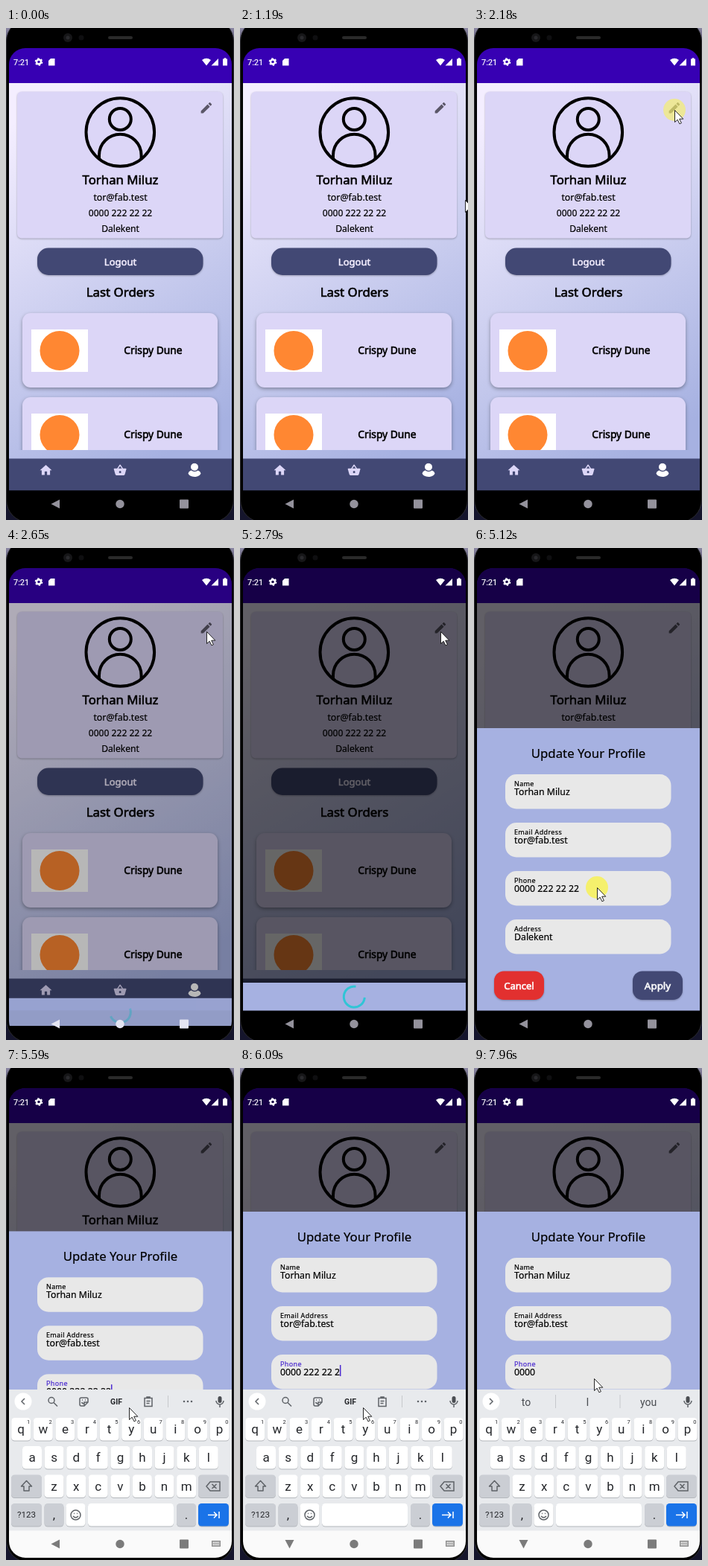
Animation of 306x661 px, one loop 8 s. Source, as an HTML page:

```html
<!DOCTYPE html>
<html lang="en">
<head>
<meta charset="utf-8">
<title>Profile screen</title>
<style>
html, body { margin: 0; width: 100%; height: 100%; overflow: hidden; background: #000; }
svg { display: block; width: 100%; height: 100%; }
text {
  font-family: "Noto Sans", "Open Sans", sans-serif; white-space: pre;
  fill: currentColor; stroke: currentColor; stroke-width: .2;
}
.mid { text-anchor: middle; }
.medium { stroke-width: .6; }
.label { font-size: 9px; letter-spacing: .35px; }
.value { font-size: 12.3px; }
.shade { filter: drop-shadow(0 1px 1px #0004); }
.deep { filter: drop-shadow(0 2.5px 2.5px #0005); }
.line { fill: none; stroke: #5f6368; stroke-width: 1.5; }
.dots { stroke-width: 2.6; stroke-linecap: round; stroke-dasharray: 0 5; }
.roboto, .kb text { font-family: Roboto, "Open Sans", sans-serif; }
.kb text { color: #25272b; stroke: none; text-anchor: middle; }
.kb .chips text { font-size: 14px; color: #4a4d52; }
</style>
</head>
<body>
<svg viewBox="0 0 306 661">
  <defs>
    <linearGradient id="sky" x1=".32" y1="0" x2=".68" y2="1">
      <stop stop-color="#f4eeff"/><stop offset="1" stop-color="#a6b1e1"/>
    </linearGradient>
    <linearGradient id="desk" x2="0" y2="1">
      <stop stop-color="#8d89a4"/><stop offset=".06" stop-color="#15152c"/>
    </linearGradient>
    <clipPath id="screen"><rect x="4" y="27" width="299" height="631" rx="22"/></clipPath>
    <clipPath id="list"><rect x="4" y="370" width="299" height="197"/></clipPath>
    <clipPath id="sheetClip"><rect id="sheetBox" x="4" width="299"/></clipPath>
  </defs>

  <!-- phone body -->
  <rect width="306" height="661" fill="url(#desk)"/>
  <rect x=".5" y="-12" width="305" height="676" rx="30" stroke="#2c2c30"/>
  <circle cx="83" cy="13" r="6" fill="#161618"/><circle cx="83" cy="13" r="2.5" fill="#29292d"/>
  <circle cx="101" cy="13" r="3.5" fill="#0e0e10"/>
  <rect x="137" y="11" width="33" height="4" rx="2" fill="#2a2a2a"/>

  <g clip-path="url(#screen)">
    <rect x="4" y="27" width="299" height="47" fill="#3700b3"/>
    <rect x="4" y="74" width="299" height="505" fill="url(#sky)"/>
    <rect class="shade" x="15" y="85.5" width="276" height="197" rx="6" fill="#dcd6f7"/>
    <g fill="none" stroke="#000" stroke-width="4">
      <circle cx="153.3" cy="140" r="45.8"/>
      <circle cx="153.3" cy="122.5" r="14.5"/>
      <path d="M125 176v-5a28.3 28.3 0 0 1 56.6 0v5"/>
    </g>
    <path transform="translate(259.2 97.6) scale(.81)" fill="#5b5768" d="M3 17.25V21h3.75L17.8 9.94l-3.75-3.75zM20.7 7.04c.4-.4.4-1 0-1.4l-2.34-2.35c-.4-.4-1-.4-1.4 0l-1.83 1.83 3.75 3.75z"/>
    <g class="mid">
      <text class="medium" x="153.5" y="210" font-size="16.8">Torhan Miluz</text>
      <text x="153.5" y="232" font-size="12.4">tor@fab.test</text>
      <text x="153.5" y="253" font-size="12.1">0000 222 22 22</text>
      <text x="153.5" y="274" font-size="12.1">Dalekent</text>
      <rect class="shade" x="42" y="295.5" width="222.5" height="36.5" rx="15" fill="#424874"/>
      <text class="medium" x="153.5" y="319" font-size="13" color="#f4eeff">Logout</text>
      <text class="medium" x="153.5" y="361" font-size="16.9">Last Orders</text>
    </g>
    <g id="orders" clip-path="url(#list)"></g>

    <rect x="4" y="578.5" width="299" height="43" fill="#424874"/>
    <path transform="translate(43.9 584.6) scale(.8)" fill="#dcd6f7" d="M10 20v-6h4v6h5v-8h3L12 3 2 12h3v8z"/>
    <path transform="translate(144 585) scale(.76)" fill="#dcd6f7" d="M17.2 9l-4.4-6.56a1 1 0 0 0-1.66 0L6.8 9H2a1 1 0 0 0-1 1.3l2.6 9.24A2 2 0 0 0 5.5 21h13a2 2 0 0 0 1.9-1.46L23 10.2A1 1 0 0 0 22 9zM9 9l3-4.4L15 9zm3 8a2 2 0 1 1 0-4 2 2 0 0 1 0 4z"/>
    <g fill="#fff">
      <ellipse cx="253" cy="598.3" rx="8.3" ry="4.7"/>
      <circle cx="253" cy="589.8" r="5.6" stroke="#424874" stroke-width="1.2"/>
    </g>
    <rect id="dim" x="4" y="27" width="299" height="594.5"/>
    <rect x="4" y="621.5" width="299" height="40"/>

    <g id="sheet" clip-path="url(#sheetClip)">
      <rect x="4" width="299" height="440" fill="#a6b1e1"/>
      <path id="spinner" fill="none" stroke="#30c5d6" stroke-width="3"/>
      <g id="form">
        <text class="mid" x="153.5" y="40" font-size="16.8">Update Your Profile</text>
        <g id="fields"></g>
        <g class="mid" color="#fff" font-size="13">
          <rect class="shade" x="27" y="326.5" width="67" height="38.5" rx="13" fill="#e2302f"/>
          <text class="medium" x="60.5" y="351">Cancel</text>
          <rect class="shade" x="213" y="326.5" width="67" height="38.5" rx="13" fill="#424874"/>
          <text class="medium" x="246.5" y="351" font-size="13.4">Apply</text>
        </g>
        <rect id="caret" y="206" width="1.5" height="15" fill="#4b2ad0"/>
      </g>
    </g>

    <g id="kb" class="kb">
      <rect x="4" y="432" width="299" height="190" fill="#e8eaed"/>
      <rect x="4" y="621.5" width="299" height="40" fill="#fafafa"/>
      <circle cx="23" cy="448" r="11.5" fill="#fff"/>
      <path id="chevron" class="line" d="M2 -4l-4 4 4 4"/>
      <g id="tools" class="line">
        <circle cx="61" cy="446.5" r="4"/><path d="M64 449.5l5 5"/>
        <path d="M110 449v-4a2 2 0 0 0-2-2h-7a2 2 0 0 0-2 2v7a2 2 0 0 0 2 2h4zh-5v5M101.5 449q2 3 4 1M102 446h1M106 446h1"/>
        <text x="148" y="452" font-size="10.5" font-weight="700" color="#5f6368">GIF</text>
        <path d="M186 443.5h10v11h-10zM189 443.5v-1.5h4v1.5M188.500 447.5h5M188.500 450.5h4"/>
        <path d="M217.5 440v16" stroke="#c6c8cc" stroke-width="1"/>
        <path class="dots" d="M239 448h11"/>
      </g>
      <g id="chips" class="chips">
        <text x="70" y="453.5">to</text><text x="152.5" y="453.5">I</text><text x="234" y="453.5">you</text>
        <path d="M109.5 439v18M196 439v18" stroke="#c6c8cc"/>
      </g>
      <rect x="284.5" y="441" width="5" height="9" rx="2.5" fill="#4a4d52"/>
      <path class="line" d="M282 447a5 5 0 0 0 10 0M287 452v4"/>
      <g id="keys"></g>
      <path class="line" stroke-linejoin="round" d="M27.5 554.5l-7 7.5h3.5v6h7v-6h3.5z"/>
      <path class="line" d="M269 562l5-6h13v12h-13zM276.5 559l6 6m0-6l-6 6"/>
      <circle class="line" cx="93.5" cy="600.5" r="6.5"/>
      <path class="line" d="M91 598.5h1M95 598.5h1M90 602q3.5 4 7 0"/>
      <path class="line" style="stroke:#fff" d="M271 600.5h12m-4-4l4 4-4 4M286 596v9"/>
      <g fill="none" stroke="#8a8a8a">
        <rect x="276.5" y="635.5" width="11" height="7" fill="#b4b4b4"/>
        <path d="M278 637.5h8M278 640.5h8" stroke="#fafafa" stroke-dasharray="1 1"/>
      </g>
    </g>

    <g id="nav">
      <path id="back" d="M-6 0L5.5 -6v12z"/>
      <circle cx="153" cy="639.5" r="5.7"/>
      <rect x="233" y="633.5" width="12" height="12" rx="1"/>
    </g>

    <g fill="#fff" color="#fff">
      <text class="roboto" x="10" y="50" font-size="11">7:21</text>
      <circle cx="44" cy="45.5" r="3" fill="none" stroke="#fff" stroke-width="2.4"/>
      <circle cx="44" cy="45.5" r="4.6" fill="none" stroke="#fff" stroke-width="1.5" stroke-dasharray="2.4 2.42"/>
      <path d="M60 41h5.5v9.5h-8.5v-6.5z"/>
      <path d="M269 50.5l-6-7.5q6-4.5 12 0zM285 41v9.5h-9.5z"/>
      <path d="M291 41.5h1.7v-1.2h2.6v1.2h1.7v9h-6z"/>
    </g>
  </g>

  <g id="pointer">
    <circle id="halo" r="15" fill="#f6f065"/>
    <path d="M.5 .5V16.5L4.2 13.2l2.7 5.6 2.5-1.100-2.700-5.500h5.100z" fill="#fff" stroke="#111" stroke-width=".9"/>
  </g>
</svg>

<script>
const LOOP = 8000, PHONE = '0000 222 22 22';
const $ = id => document.getElementById(id);
const clamp = v => Math.min(1, Math.max(0, v));
const ramp = (t, a, b) => clamp((t - a) / (b - a));
const mix = (a, b, k) => a + (b - a) * k;
const smooth = k => k * k * (3 - 2 * k);
const easeOut = k => 1 - (1 - k) ** 3;
const set = (id, attrs) => { for (const k in attrs) $(id).setAttribute(k, attrs[k]); };
const show = (id, on) => { $(id).style.display = on ? '' : 'none'; };
const at = (x, y) => `translate(${x} ${y})`;

$('orders').innerHTML = [383, 496].map(y => `<g transform="${at(0, y)}">
  <rect class="deep" x="22" width="262" height="100" rx="11" fill="#dcd6f7"/>
  <rect x="34" y="22" width="76" height="57" fill="#fff"/>
  <circle cx="72" cy="50.5" r="26.5" fill="#ff8732"/>
  <text class="mid medium" x="197.5" y="55" font-size="13.8">Crispy Dune</text></g>`).join('');

const fields = [['Name', 'Torhan Miluz'], ['Email Address', 'tor@fab.test'], ['Phone', PHONE], ['Address', 'Dalekent']];
$('fields').innerHTML = fields.map(([label, value], i) => `<g transform="${at(0, 62 + 65 * i)}">
  <rect x="42" width="222.5" height="46.5" rx="15" fill="#e8e8e8"/>
  <text class="label" x="54" y="15.5" id="label${i}">${label}</text>
  <text class="value" x="54" y="28" id="value${i}">${value}</text></g>`).join('');

// keyboard
const GREY = '#cbced4', STEP = 29.6;
function key(cx, y, ch = '', w = 26, fill = '#fff', size = 17) {
  return `<rect x="${cx - w / 2}" y="${y + 1}" width="${w}" height="30.5" rx="4.5" fill="#b4b7bc"/>
    <rect x="${cx - w / 2}" y="${y}" width="${w}" height="30.5" rx="4.5" fill="${fill}"/>
    <text x="${cx}" y="${y + 15 + size * .36}" font-size="${size}">${ch}</text>`;
}
const row = (chars, x, y) => [...chars].map((c, i) => key(x + i * STEP, y, c)).join('');
const hints = [...'1234567890'].map((c, i) => `<text x="${30 + i * STEP}" y="478" font-size="7.5">${c}</text>`).join('');
$('keys').innerHTML = row('qwertyuiop', 20.2, 470) + hints + row('asdfghjkl', 35, 508) + row('zxcvbnm', 64.5, 546.5)
  + key(27.5, 546.5, '', 41, GREY) + key(278.5, 546.5, '', 41, GREY)
  + key(27.5, 585, '?123', 41, GREY, 11.5) + key(64.5, 585, ',', 26, GREY) + key(93.5, 585)
  + key(167.5, 585, '', 115) + key(242, 585, '.', 26, GREY) + key(278.5, 585, '', 41, '#1a73e8');

// pointer stops: time, x, y
const stops = [[1190, 302, 231], [1970, 272, 116], [2040, 269, 110], [2400, 269, 110], [2450, 269, 112],
  [3560, 269, 112], [3840, 237, 190], [4110, 237, 190], [4720, 154, 447], [4860, 165, 456], [6700, 165, 456], [7100, 161, 417]];
const clicks = [2040, 5120];
const deletions = [6090, 6290, 6490, 6760, 6830, 6980, 7100, 7300, 7440];

function drawPointer(t) {
  const i = stops.findLastIndex(s => t >= s[0]);
  show('pointer', i >= 0);
  if (i < 0) return;
  const a = stops[i], b = stops[i + 1] || a;
  const k = a === b ? 0 : smooth(ramp(t, a[0], b[0]));
  set('pointer', { transform: at(mix(a[1], b[1], k), mix(a[2], b[2], k)) });
  const click = clicks.find(c => t >= c && t < c + 210);
  set('halo', { opacity: click ? .95 * (1 - ramp(t, click + 100, click + 230)) : 0 });
}

function drawSheet(t) {
  const shown = t >= 2650, rise = easeOut(ramp(t, 2650, 2790));
  const grow = easeOut(ramp(t, 3000, 3330)), lift = smooth(ramp(t, 5400, 5800));
  set('dim', { opacity: shown ? mix(.28, .6, ramp(t, 2650, 2780)) : 0 });
  const top = mix(584, 242, grow) - 49 * lift;
  show('sheet', shown);
  set('sheet', { transform: at(0, top + 21 * (1 - rise)), opacity: mix(.88, 1, rise) });
  set('sheetBox', { height: 621.5 - top });
  show('form', t >= 3000);
  show('spinner', t < 3000);

  const dt = t - 2650, from = (-20 + dt * .17) * Math.PI / 180;
  const span = (175 + 100 * Math.sin(dt / 90)) * Math.PI / 180;
  const point = a => `${153.3 + 14 * Math.cos(a)} ${19 + 14 * Math.sin(a)}`;
  set('spinner', {
    d: `M${point(from)}A14 14 0 ${span > Math.PI ? 1 : 0} 1 ${point(from + span)}`,
    opacity: mix(.45, 1, rise),
  });
}

function drawTyping(t) {
  const n = deletions.filter(d => t >= d).length;
  const text = PHONE.slice(0, PHONE.length - n);
  const spaced = count => PHONE[PHONE.length - count - 1] === ' ' ? 1 : 0;
  const fade = n ? ramp(t, deletions[n - 1], deletions[n - 1] + 70) : 1;
  const chips = n ? mix(spaced(n - 1), spaced(n), fade) : 0;
  set('chips', { opacity: chips });
  set('tools', { opacity: 1 - chips });
  set('chevron', { transform: `${at(23, 448)} rotate(${180 * chips})` });

  const value = $('value2'), focused = t >= 5190;
  if (value.textContent !== text) value.textContent = text;
  set('label2', { color: focused ? '#4b2ad0' : '#000' });
  set('caret', { x: 54 + value.getComputedTextLength(), opacity: focused && t < 7960 ? 1 : 0 });
}

function drawKeyboard(t) {
  const up = easeOut(ramp(t, 5260, 5600)), sheetOver = t >= 2650 && t < 2760;
  show('kb', up > 0);
  set('kb', { transform: at(0, 226 * (1 - up)) });
  set('nav', { fill: up > .5 ? '#7b7b7b' : sheetOver ? '#e4e5f2' : '#94929c' });
  set('back', { transform: `${at(66.5, 639.5)} rotate(${t >= 5940 ? -90 : 0})` });
}

function frame(now) {
  const t = now % LOOP;
  drawSheet(t);
  drawTyping(t);
  drawKeyboard(t);
  drawPointer(t);
  requestAnimationFrame(frame);
}
requestAnimationFrame(frame);
</script>
</body>
</html>
```
